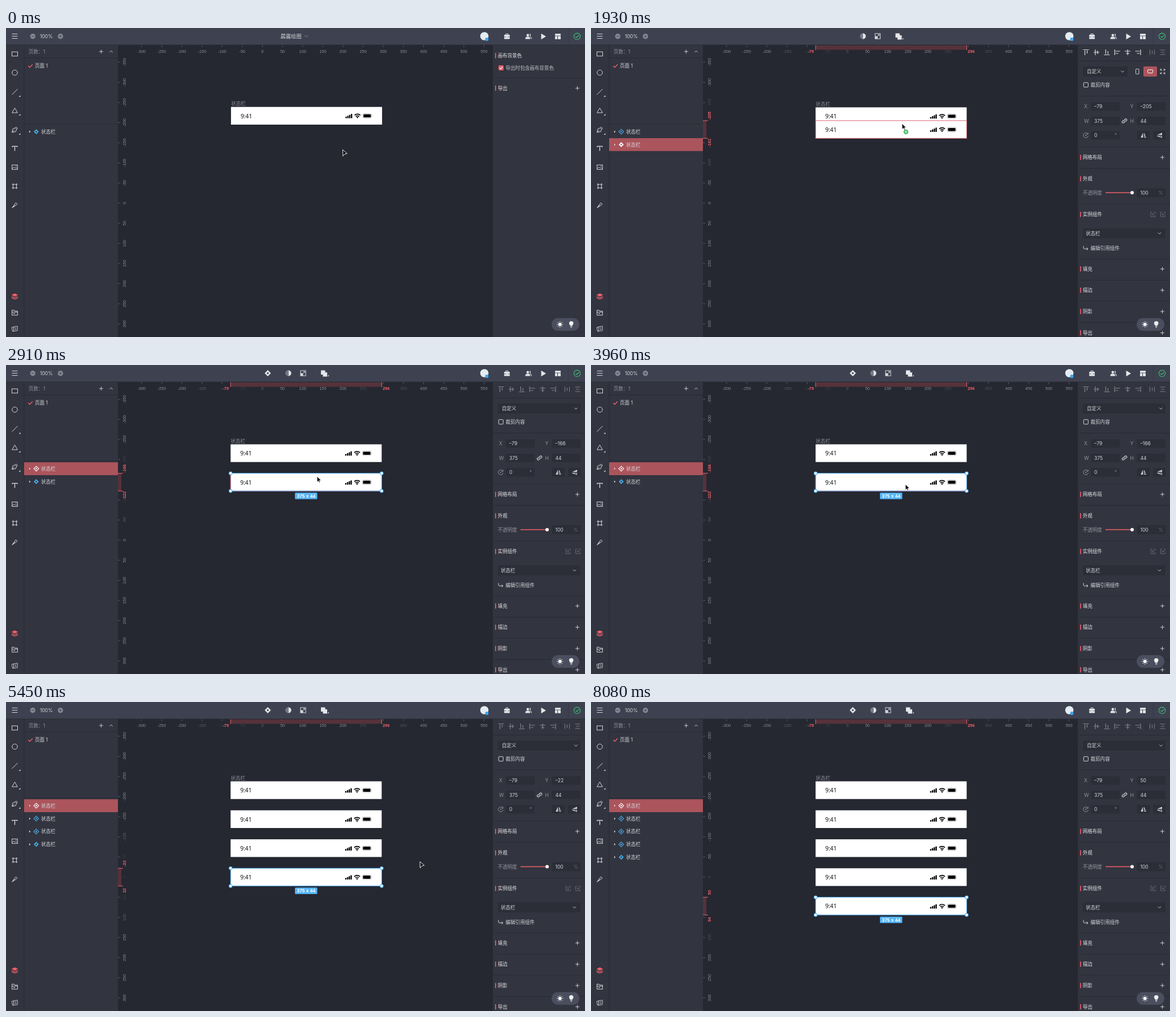
Recreate the animation shown at these times as an HTML page. Size 1024 by 547 pixels, loop 8180 ms.

```html
<!DOCTYPE html>
<html lang="zh">
<head>
<meta charset="utf-8">
<title>Design editor</title>
<style>
html, body { margin: 0; width: 100%; height: 100%; overflow: hidden; background: #252731; }
svg { display: block; width: 100%; height: 100%; font-family: Inter, "Noto Sans CJK SC", "Noto Sans CJK", sans-serif; }
.ruler { font-family: "Liberation Sans", sans-serif; }
.clock { font-family: "Noto Sans", sans-serif; }
</style>
</head>
<body>
<svg id="stage" viewBox="0 0 1024 547"></svg>
<script>
const LOOP = 8180, SCALE = 0.7125;
const PANEL = '#32343f', CANVAS = '#252731', FIELD = '#2b2d37', EDGE = '#282a34';
const TEXT = '#d6d7dc', GREY = '#92949d', DIM = '#656772', RED = '#f0616a', ROW = '#ab545c', BLUE = '#53b4f5';
const NAME = '状态栏';

const screenX = v => 453.5 + v * SCALE;
const screenY = v => 310 + v * SCALE;

// Drawing helpers; text is placed by its vertical centre.
const box = (x, y, w, h, fill, r = 0, extra = '') =>
  `<rect x="${x}" y="${y}" width="${w}" height="${h}" fill="${fill}" rx="${r}" ${extra}/>`;
const line = (d, color = TEXT, width = 1) =>
  `<path d="${d}" fill="none" stroke="${color}" stroke-width="${width}"/>`;
const shape = (d, color = TEXT) => `<path d="${d}" fill="${color}"/>`;
const dot = (x, y, r, fill, stroke = 'none', width = 1) =>
  `<circle cx="${x}" cy="${y}" r="${r}" fill="${fill}" stroke="${stroke}" stroke-width="${width}"/>`;
const text = (x, y, s, color = TEXT, size = 8.55, extra = '') =>
  `<text x="${x}" y="${y + size * 0.37}" fill="${color}" font-size="${size}" ${extra}>${s}</text>`;
const at = (x, y, content, extra = '') => `<g transform="translate(${x} ${y})" ${extra}>${content}</g>`;
const frame = (x, y, w, h, color = TEXT, r = 0) =>
  box(x, y, w, h, 'none', r, `stroke="${color}"`);
const plus = (x, y, color = TEXT, r = 3.5) => line(`M${x - r} ${y}h${2 * r}M${x} ${y - r}v${2 * r}`, color, 0.9);
const chevron = (x, y, dir = 1, color = TEXT) => line(`M${x - 2.7} ${y - 1.4 * dir}l2.7 ${2.8 * dir} 2.7 ${-2.8 * dir}`, color, 0.9);
const rule = y => box(862, y, 162, 1, EDGE);

// Hard steps: [start time, ...values]
const CURSOR = [
  [0, 595, 215], [150, 577, 187], [390, 558, 156], [980, 555, 151], [1160, 551, 147], [1340, 550, 145],
  [1630, 550, 155], [1800, 550, 169], [1980, 550, 183], [2150, 550, 192], [2320, 550, 197],
  [3660, 552, 202], [3810, 555, 208], [3960, 556, 211], [4560, 625, 240], [4710, 700, 272], [4850, 731.5, 282],
  [6680, 757, 340], [6860, 779, 394], [7160, 771.5, 430], [7300, 908, 530], [7450, -50, -50]
];
const COPY_Y = [[1630, -225], [1800, -205], [1980, -185], [2150, -173], [2320, -166], [4410, -94], [5450, -22], [6350, 50]];
const COUNT = [[0, 1], [1630, 2], [4410, 3], [5450, 4], [6350, 5]];
const stepAt = (steps, t) => steps.filter(s => s[0] <= t).pop();

function stateAt(t) {
  const moved = t >= 1340;
  const copy = stepAt(COPY_Y, t);
  return {
    cursor: stepAt(CURSOR, t).slice(1),
    count: stepAt(COUNT, t)[1],
    hover: t >= 390 && t < 680,
    selected: t >= 680,
    copying: t >= 1340 && t < 2910,
    dragging: t >= 1630 && t < 2910,
    snapped: t >= 2320 && t < 2910,
    released: t >= 2910,
    tinted: t >= 2910 && t < 4410,
    x: moved ? -79 : -78,
    top: moved ? -238 : -239,
    y: copy ? copy[1] : moved ? -238 : -239
  };
}

function diamond(x, y, color, filled, hole) {
  const outline = 'M0-4.4L4.4 0 0 4.4-4.4 0Z', core = 'M0-1.7L1.7 0 0 1.7-1.7 0Z';
  return at(x, y, filled ? shape(outline, color) + shape(core, hole) : line(outline, color, 1.1) + shape(core, color));
}

function tools() {
  const corner = y => shape(`M25.5 ${y}v-3l-3 3Z`, TEXT);
  return frame(10.5, 42.2, 10, 7.5) + dot(15.5, 79, 4.7, 'none', TEXT) +
    line('M10.5 118L20.5 108') + line('M15.5 141.5L20.3 150H10.7Z') +
    at(15.5, 180, line('M-4.8 4.8L-3.5-1.5 1-3.2 3.3-.9 1.6 3.5ZM-4.8 4.8L-.6.6M1-3.2L2.5-4.8 4.9-2.4 3.3-.9')) +
    corner(122) + corner(155) + corner(189) +
    line('M11.2 211v-1.6h8.6V211M15.5 209.4v8', TEXT, 1.4) +
    frame(10.7, 242.4, 9.6, 8) + line('M11 249l3-3 2.3 2.3 1.4-1.4 2.6 2.6', TEXT, 0.9) + dot(17.7, 244.8, 0.8, TEXT) +
    line('M12.5 275v10M18.5 275v10M10.5 277h10M10.5 283h10') +
    line('M10.8 318.3L17.5 309.2 20 311.7 14.8 315.8ZM10.8 318.3l4.5-4.5') +
    at(15.5, 475, shape('M0-5.2L5.8-2.4 0 .4-5.8-2.4Z', RED) + line('M-5.5.2L0 2.8 5.5.2M-5.5 2.6L0 5.2 5.5 2.6', RED, 1.2)) +
    line('M10.6 508.3v-8.8h4l1 1.6h4.8v7.2ZM10.6 503h9.8M13 505.5h3') +
    line('M13.5 529l6.7-1.2v7.8l-6.7 1.2ZM13.5 529l-3.3 1 1.5 7 1.8-.4M15.5 531h2.7M15.5 533.5h2.7', TEXT, 0.9);
}

function topBar(s) {
  const contrast = x => at(x, 14.5, dot(0, 0, 4.8, 'none', GREY) + shape('M0-4.8A4.8 4.8 0 0 1 0 4.8Z', '#e5e6ea') + shape('M0-4.8A4.8 4.8 0 0 0 0 4.8Z', '#777a86'));
  const resize = x => at(x, 14.5, frame(-4.6, -4.6, 9.2, 9.2) + shape('M-4.6 4.6V0H0v4.6Z') + line('M0 0L2.7-2.7M.4-2.8h2.4v2.4'));
  const union = x => at(x, 14.5, box(-6, -5, 7.5, 7.5, '#e5e6ea') + box(-2.5, -1.5, 7.5, 7.5, '#e5e6ea') + shape('M8 5.5v-2.5l-2.5 2.5Z'));
  const centre = !s.selected
    ? text(485.5, 14.5, '晨露绘图', TEXT, 9.3) + chevron(531, 14.5, 1, GREY)
    : s.released
      ? at(463, 14.5, shape('M0-5.5L5.5 0 0 5.5-5.5 0Z', '#e5e6ea') + shape('M0-2L2 0 0 2-2 0Z', '#3e4250')) + contrast(499.5) + resize(525.5) + union(563)
      : contrast(481) + resize(507) + union(544.5);
  return box(0, 0, 1024, 30, '#3e4250') + box(0, 29.5, 1024, 1, EDGE) +
    line('M10.5 10.5h10M10.5 14.5h10M10.5 18.5h10') +
    dot(47.3, 14.7, 4.7, '#858892') + line('M44.8 14.7h5', '#3e4250') +
    text(60, 14.7, '100%') +
    dot(96.3, 14.7, 4.7, '#858892') + plus(96.3, 14.7, '#3e4250', 2.5) + centre +
    dot(846, 14.5, 7.3, '#e4ecf2') + dot(850.3, 20, 3, '#3da5f5') +
    at(886, 15, box(-5, -3, 10, 7.5, '#e5e6ea', 1) + line('M-2-3v-1.7h4V-3', '#e5e6ea') + line('M-5 .8h3.7M1.3.8H5', '#3e4250', 0.8)) +
    at(924, 15, dot(-1.2, -2.3, 2.3, '#e5e6ea') + shape('M-5.5 4.6C-5.5.5-3 .6-1.2.6S3 .5 3 4.6Z', '#e5e6ea') + line('M2-4.4a2.2 2.2 0 0 1 0 4.2M3.2 1c1.6.5 2 1.7 2 3.4', '#e5e6ea', 1.2)) +
    shape('M946.5 9.7L955 15 946.5 20.3Z', '#e5e6ea') +
    at(976, 15, box(-5, -4.8, 10, 3.4, '#e5e6ea') + box(-5, -0.6, 4, 5.4, '#e5e6ea') + box(0, -0.6, 5, 5.4, '#e5e6ea')) +
    box(994, 0, 1, 30, '#343743') +
    dot(1010, 14.8, 5.7, 'none', '#3cbf74', 1.1) + line('M1007.2 14.8l2.2 2.2 3.8-4', '#3cbf74', 1.2);
}

function layers(s) {
  let out = box(32, 30, 166, 517, PANEL) + box(31.5, 30, 1, 517, EDGE) +
    text(40, 42, '页数：1', GREY) + plus(168.3, 41.7) + chevron(186, 41.7, -1) + box(32, 52.5, 166, 1, EDGE) +
    line('M39.3 67l2.7 2.7 5-5.2', RED, 1.3) + text(51, 67, '页面 1') + box(32, 169.5, 166, 1, EDGE);
  const active = s.selected ? (s.dragging ? 1 : 0) : -1;
  for (let i = 0; i < s.count; i++) {
    const y = 183.6 + i * 22.8, on = i === active;
    const filled = s.dragging ? on : i === s.count - 1;
    const back = on ? ROW : s.hover ? '#40434f' : PANEL;
    if (back !== PANEL) out += box(32, y - 11.4, 166, 22.8, back);
    out += shape(`M41 ${y - 2}l2.4 2-2.4 2Z`) + diamond(53.5, y, on ? '#fff' : '#4aa9e8', filled, back) + text(62, y, NAME);
  }
  return out;
}

function rulers(s) {
  let out = '';
  const size = 7.4, ends = { x: [s.x, s.x + 375], y: [s.y, s.y + 44] };
  const label = (axis, pos, value, color, extra = '') => axis === 'x'
    ? text(pos, 41, value, color, size, `text-anchor="middle" ${extra}`)
    : at(209, pos, text(0, 0, value, color, size, `text-anchor="middle" transform="rotate(-90)" ${extra}`));
  const tick = (axis, pos, color, length) => axis === 'x'
    ? box(pos - 0.5, 30, 1, length, color) : box(198, pos - 0.5, length, 1, color);
  for (const [axis, from, to, project] of [['x', -300, 550, screenX], ['y', -350, 300, screenY]]) {
    for (let v = from; v <= to; v += 50) {
      const gap = s.selected ? Math.min(...ends[axis].map(e => Math.abs(e - v))) : 99;
      const alpha = gap < 20 ? 0 : gap < 80 ? gap / 140 : 1;
      out += tick(axis, project(v), '#555762', 4);
      if (alpha) out += label(axis, project(v), v, '#8b8d96', `opacity="${alpha}"`);
    }
    if (!s.selected) continue;
    const [a, b] = ends[axis].map(project);
    out += axis === 'x' ? box(a, 30.5, b - a, 8, '#56323b') : box(198, a, 6, b - a, '#56323b');
    out += tick(axis, a, RED, 9) + tick(axis, b, RED, 9) +
      label(axis, a - 8.5, ends[axis][0], RED, 'font-weight="bold"') + label(axis, b + 8, ends[axis][1], RED, 'font-weight="bold"');
  }
  return `<g class="ruler">${out}</g>`;
}

function statusBar(x, y) {
  const signal = [0, 1, 2, 3].map(i => box(202.5 + i * 3.2, 17.2 - i * 1.6, 2.3, 2.8 + i * 1.6, '#000', 0.6)).join('');
  const wifi = line('M218.6 14.7a7.3 7.3 0 0 1 10.2 0', '#000', 1.7) +
    line('M220.7 17.1a4.4 4.4 0 0 1 6 0', '#000', 1.6) + shape('M221.9 18.4a2.7 2.7 0 0 1 3.6 0L223.7 20.4Z', '#000');
  const battery = box(233, 11.8, 15.6, 8, 'none', 2, 'stroke="#aaa" stroke-width=".7"') +
    box(234.2, 13, 13.2, 5.6, '#000', 1.2) + shape('M249.3 14.3q1.3 1.5 0 3Z', '#999');
  return at(x, y, box(0, 0, 375 * SCALE, 44 * SCALE, '#fff') +
    text(17, 16, '9:41', '#111', 10.3, 'class="clock" font-weight="500"') + signal + wifi + battery);
}

function artboards(s) {
  const x = screenX(s.x), w = 375 * SCALE, h = 44 * SCALE, right = x + w, mid = x + w / 2;
  const first = screenY(s.top), y = screenY(s.y);
  const blueLabel = s.hover || (s.selected && s.count === 1);
  let out = text(x + 0.3, first - 6, NAME, blueLabel ? BLUE : '#8b8d96');
  for (let i = 0; i < s.count; i++) out += statusBar(x, i === s.count - 1 ? y : screenY(s.top + 72 * i));
  if (s.hover) out += frame(x, y, w, h, BLUE);
  if (s.dragging) {
    out += frame(x, y, w, h, '#d9656d');
    if (s.snapped) {
      out += line(`M${x} ${first}H${right}M${x} ${y + h}H${right}`, '#d9656d') +
        line(`M${x} ${first}V${y + h}M${mid} ${first}V${y + h}M${right} ${first}V${y + h}`, '#5b8fe0', 0.8) +
        line(`M${mid} ${first + h}V${y}`, '#4c94f4', 1.3) +
        box(533.5, 175, 15.5, 13, '#4c94f4', 1) + text(541.2, 181.5, '28', '#fff', 8.6, 'text-anchor="middle" font-weight="500"');
    }
  } else if (s.selected) {
    out += frame(x, y, w, h, BLUE);
    if (s.tinted) out += line(`M${x} ${y}v${h}`, '#e2656d') + line(`M${x} ${y + h}h${w}`, '#9a83b5');
    for (const cx of [x, right]) for (const cy of [y, y + h]) out += dot(cx, cy, 2.7, '#fff', BLUE, 1.1);
    out += box(mid - 19.8, y + h + 2.9, 39.5, 11.4, BLUE, 1.5) +
      text(mid, y + h + 8.6, '375 x 44', '#fff', 8.4, 'text-anchor="middle" font-weight="bold" class="ruler"');
  }
  return out;
}

const section = (y, title, add = true) => box(865, y - 4.6, 1.6, 9.2, RED) + text(869.7, y, title, '#e8e9ec') + (add ? plus(1010.5, y) : '');

function alignIcons(dim) {
  const bars = [
    'M-5-4.5H5M-2-3V5M2-3V2', 'M-5 0H5M-2-5V5M2-3V3', 'M-5 4.5H5M-2-5V3M2-2V3',
    'M-4.5-5V5M-3-2H5M-3 2H2', 'M0-5V5M-5-2H5M-3 2H3', 'M4.5-5V5M-5-2H3M-2 2H3'
  ];
  return bars.map((d, i) => at(875.5 + i * 18.4, 43, line(d, dim ? '#85878f' : '#e0e1e5', 1.2))).join('') +
    box(980, 37, 1, 12, EDGE) + at(992.5, 43, line('M-4-4.5v9M4-4.5v9M0-3v6', '#7b7d87')) +
    at(1011, 43, line('M-4.5-4h9M-4.5 4h9M-3 0h6', '#7b7d87'));
}

function properties(s) {
  const field = (x, y, label, value) => text(x - 12, y, label, GREY) + box(x, y - 7.5, 51, 15, FIELD, 2) + text(x + 6, y, value);
  const signed = v => String(v).replace('-', '–');
  const instance = s.count > 1;
  let out = alignIcons(s.released) + rule(58) + box(870, 68, s.released ? 146 : 79, 18, FIELD, 2) +
    text(877, 77, '自定义') + chevron(s.released ? 1008 : 940, 77);
  if (!s.released) out += frame(963.5, 72.5, 5.4, 9, TEXT, 1) + box(977, 68, 24, 18, ROW, 2) + frame(984.7, 74, 8.8, 5.6, '#fff', 1) +
    at(1011, 77, line('M-4-1.5V-4h2.5M1.5-4H4v2.5M4 1.5V4H1.5M-1.5 4H-4V1.5M-4-4l2.6 2.6M4-4L1.4-1.4M4 4L1.4 1.4M-4 4l2.6-2.6'));
  out += frame(871.3, 96.7, 8, 8, TEXT, 1) + text(883.5, 101, '裁剪内容') + rule(120) +
    field(884, 139, 'X', signed(s.x)) + field(965.5, 139, 'Y', signed(s.y)) +
    field(884, 164.5, 'W', 375) + field(965.5, 164.5, 'H', 44) +
    at(943.5, 164.5, line('M-1 1.2a2 2 0 0 1 0-2.6L1-3a1.9 1.9 0 0 1 2.7 2.7L2.5.9M1-1.2a2 2 0 0 1 0 2.6L-1 3a1.9 1.9 0 0 1-2.7-2.7L-2.5-.9', TEXT, 1.1)) +
    field(884, 190, '', 0) + text(926, 190, '°', GREY) +
    at(875, 190, line('M3.8-2A4.3 4.3 0 1 0 4.2 1M4-4.5V-1.8H1.3', GREY) + dot(0, 0, 1.1, GREY)) +
    box(965.5, 182, 22.5, 15.5, FIELD, 2) + box(994, 182, 22.5, 15.5, FIELD, 2) +
    at(977, 190, shape('M-1-4.5V4H-4.7Z') + line('M1.2-3.5V3.6H4.3Z', TEXT, 0.9)) +
    at(1005.5, 190, shape('M-4.5-.8H4.5V-4.6Z') + line('M-4 1.3H4V4.2Z', TEXT, 0.9)) +
    rule(210) + section(229, '网格布局') + rule(248) + section(267, '外观', false) +
    text(869.7, 291.5, '不透明度', GREY) + line('M910 291.5h47', RED, 1.4) + dot(957, 291.5, 3, '#fff') +
    box(965.5, 283.5, 51, 16, FIELD, 2) + text(971.5, 291.5, '100') + text(1003.5, 291.5, '%', DIM) + rule(311);
  if (instance) {
    const bracket = (x, d) => at(x, 330, line('M-1.5-4H-4V4H4V1.5M1.5-4H4v2.5', DIM) + line(d, DIM));
    out += section(330, '实例组件', false) + bracket(994, 'M0 3V-2M-2 0L0-2 2 0') + bracket(1011.5, 'M-2 0H3M0-2v4') +
      box(870, 354.5, 146, 18, FIELD, 2) + text(875, 363.5, NAME) + chevron(1005.5, 363.5) +
      line('M871 386v3.2q0 1.8 1.8 1.8h6M876.5 388.6l2.4 2.4-2.4 2.4') + text(883.5, 390.3, '编辑引用组件') + rule(408);
  }
  const start = instance ? 426.5 : 330;
  ['填充', '描边', '阴影', '导出'].forEach((title, i) => {
    const y = start + i * 37.7;
    out += section(y, title) + (i < 3 ? rule(Math.round(y + 19)) : '');
  });
  return out;
}

const pageSettings = () => section(49, '画布背景色', false) +
  box(871, 66, 9, 9, '#e0606a', 1.5) + line('M873 70.5l1.9 1.9 3.3-3.6', '#fff', 1.1) +
  text(883.5, 70.5, '导出时包含画布背景色', '#c2c3c9') + rule(88) + section(106.5, '导出');

function themeSwitch() {
  const rays = Array.from({ length: 8 }, (_, i) => `<path d="M0-4v-1.6" stroke="#fff" transform="rotate(${i * 45})"/>`).join('');
  return box(965, 513.5, 49, 22.5, '#4b4e5e', 11.2) + at(979.7, 524.7, dot(0, 0, 3, '#fff') + rays) +
    at(999.7, 524.7, shape('M-2 2.2C-2 .8-3.8 0-3.8-2a3.8 3.8 0 0 1 7.6 0C3.8 0 2 .8 2 2.2Z', '#f1f1f3') + line('M-1.7 3.8h3.4M-1 5.3h2', '#f1f1f3', 1.1));
}

function pointer(s) {
  const overBar = s.cursor[0] < 566 && s.cursor[1] < 214;
  const d = overBar && s.selected || s.hover
    ? 'M0 0V10.4L2.5 8.3 4.1 11.4 5.8 10.5 4.3 7.6H7.7Z' : 'M.5.5L8.3 7.2 4 8.2.9 11.8Z';
  const badge = s.copying ? dot(7, 14.8, 4.4, '#41b960', '#d9f2df', 0.7) + plus(7, 14.8, '#fff', 2.4) : '';
  return at(...s.cursor, `<path d="${d}" fill="#101114" stroke="#fff" stroke-width=".9"/>` + badge);
}

const stage = document.getElementById('stage');
let shown = '';

function draw(now) {
  const s = stateAt(now % LOOP), key = JSON.stringify(s);
  if (key !== shown) {
    shown = key;
    stage.innerHTML = box(0, 0, 1024, 547, CANVAS) + rulers(s) + artboards(s) +
      box(0, 30, 32, 517, PANEL) + tools() + layers(s) +
      box(861, 30, 163, 517, PANEL) + (s.selected ? properties(s) : pageSettings()) +
      themeSwitch() + topBar(s) + pointer(s);
  }
  requestAnimationFrame(draw);
}
draw(0);
</script>
</body>
</html>
```
